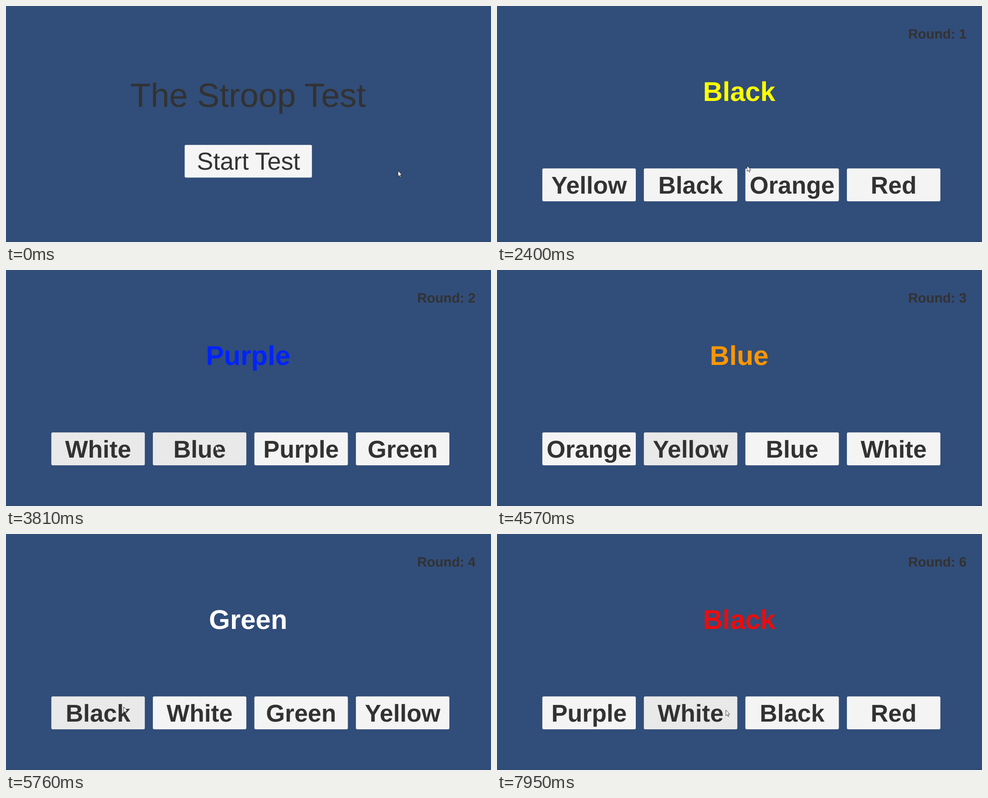
Write an HTML page that moves like this. It is 1073 px wide and 522 px high and loops after 8000 ms.

```html
<!DOCTYPE html>
<html lang="en">
<head>
<meta charset="utf-8">
<title>The Stroop Test</title>
<style>
html, body { margin: 0; width: 100%; height: 100%; overflow: hidden; background: #314d79; }
svg { display: block; width: 1073px; height: 522px; font-family: "Liberation Sans", Arial, sans-serif; }
text { fill: #323232; text-anchor: middle; text-rendering: geometricPrecision; }
#title { font-size: 74px; }
#game { font-weight: bold; }
#word { font-size: 60px; }
#round { font-size: 29.8px; text-anchor: start; }
.label { font-size: 54.3px; }
#game .label { font-size: 53.7px; }
</style>
</head>
<body>
<svg viewBox="0 0 1073 522">
  <rect width="1073" height="522" fill="#314d79"/>
  <rect y="521" width="1073" height="1" fill="#2c456b"/>
  <g id="intro">
    <text id="title" x="535.5" y="223">The Stroop Test</text>
    <rect id="start" x="395.3" y="307.2" width="281.5" height="72.3" rx="3"/>
    <text class="label" x="536.5" y="362">Start Test</text>
  </g>
  <g id="game">
    <text id="round" x="909.8" y="71.5"></text>
    <text id="word" x="535.7" y="210"></text>
  </g>
  <path id="cursor" d="M.4 .4V13.2L3.3 10.5 5.3 14.8 7 14 5 9.8H9Z" fill="#fff" stroke="#141414" stroke-width=".8"/>
</svg>
<script>
const LOOP = 8000, STEP = 108.8;
const NORMAL = '#f4f4f4', HOVER = '#e9e9e9', PRESSED = '#bebebe';
const INKS = { Yellow: '#ffff00', Blue: '#0023ff', Orange: '#ff9600', White: '#ffffff', Red: '#eb0c0c' };
const BUTTON = { left: 100.3, top: 359.2, width: 206.8, height: 72.7, pitch: 224.6 };

// the right answer is the button that names the ink
const rounds = [
  { from: 1300, word: 'Black', ink: 'Yellow', labels: 'Yellow Black Orange Red' },
  { from: 2820, word: 'Purple', ink: 'Blue', labels: 'White Blue Purple Green' },
  { from: 4450, word: 'Blue', ink: 'Orange', labels: 'Orange Yellow Blue White' },
  { from: 5640, word: 'Green', ink: 'White', labels: 'Black White Green Yellow' },
  { from: 6510, word: 'Blue', ink: 'Yellow', labels: 'Purple Yellow Blue Orange' },
  { from: 7710, word: 'Black', ink: 'Red', labels: 'Purple White Black Red' }
].map(r => {
  const labels = r.labels.split(' ');
  return { ...r, labels, answer: labels.indexOf(r.ink) };
});

const home = { x: 867, y: 364 };
const moves = [
  { from: 0, to: 430, x: 607, y: 336 },
  { from: 540, to: 760, x: 571, y: 351 },
  { from: 2340, to: 2720, x: 235, y: 385 },
  { from: 3100, to: 3960, x: 484, y: 388 },
  { from: 4700, to: 5540, x: 260, y: 382 },
  { from: 5800, to: 6410, x: 420, y: 380 },
  { from: 6640, to: 7440, x: 506, y: 389 }
];

const $ = id => document.getElementById(id);
const game = $('game');
const ease = u => u * u * (3 - 2 * u);

function add(tag, attrs) {
  const el = document.createElementNS('http://www.w3.org/2000/svg', tag);
  for (const name in attrs) el.setAttribute(name, attrs[name]);
  return game.appendChild(el);
}

const buttons = [0, 1, 2, 3].map(i => {
  const x = BUTTON.left + i * BUTTON.pitch;
  return {
    x,
    box: add('rect', { x, y: BUTTON.top, width: BUTTON.width, height: BUTTON.height, rx: 3 }),
    label: add('text', { class: 'label', x: x + BUTTON.width / 2, y: 415 })
  };
});

function cursorAt(t) {
  let { x, y } = home;
  for (const m of moves) {
    const f = ease(Math.min(1, Math.max(0, (t - m.from) / (m.to - m.from))));
    x += (m.x - x) * f;
    y += (m.y - y) * f;
  }
  return { x, y };
}

// a button is held down for the last step before the next round
const pressedBefore = (round, t) => round !== undefined && t >= round.from - STEP;

function drawRound(n, t, { x, y }) {
  const round = rounds[n];
  const pressing = pressedBefore(rounds[n + 1], t);
  // the last clicked button stays selected until the next click
  const selected = pressing ? round.answer : rounds[n - 1]?.answer;
  $('round').textContent = 'Round: ' + (n + 1);
  $('word').textContent = round.word;
  $('word').style.fill = INKS[round.ink];
  buttons.forEach((b, i) => {
    const over = x >= b.x && x < b.x + BUTTON.width && y >= BUTTON.top;
    const fill = pressing && i === selected ? PRESSED : over || i === selected ? HOVER : NORMAL;
    b.box.setAttribute('fill', fill);
    b.label.textContent = round.labels[i];
  });
}

function draw(time) {
  // the picture advances in even steps
  const t = Math.floor((time % LOOP + 10) / STEP) * STEP;
  const cursor = cursorAt(t);
  const n = rounds.findLastIndex(r => r.from <= t);
  $('intro').style.display = n < 0 ? '' : 'none';
  game.style.display = n < 0 ? 'none' : '';
  $('start').setAttribute('fill', pressedBefore(rounds[0], t) ? PRESSED : '#f5f5f5');
  if (n >= 0) drawRound(n, t, cursor);
  $('cursor').setAttribute('transform', `translate(${cursor.x} ${cursor.y})`);
}

const begin = performance.now();
(function tick() {
  draw(performance.now() - begin);
  requestAnimationFrame(tick);
})();
</script>
</body>
</html>
```
